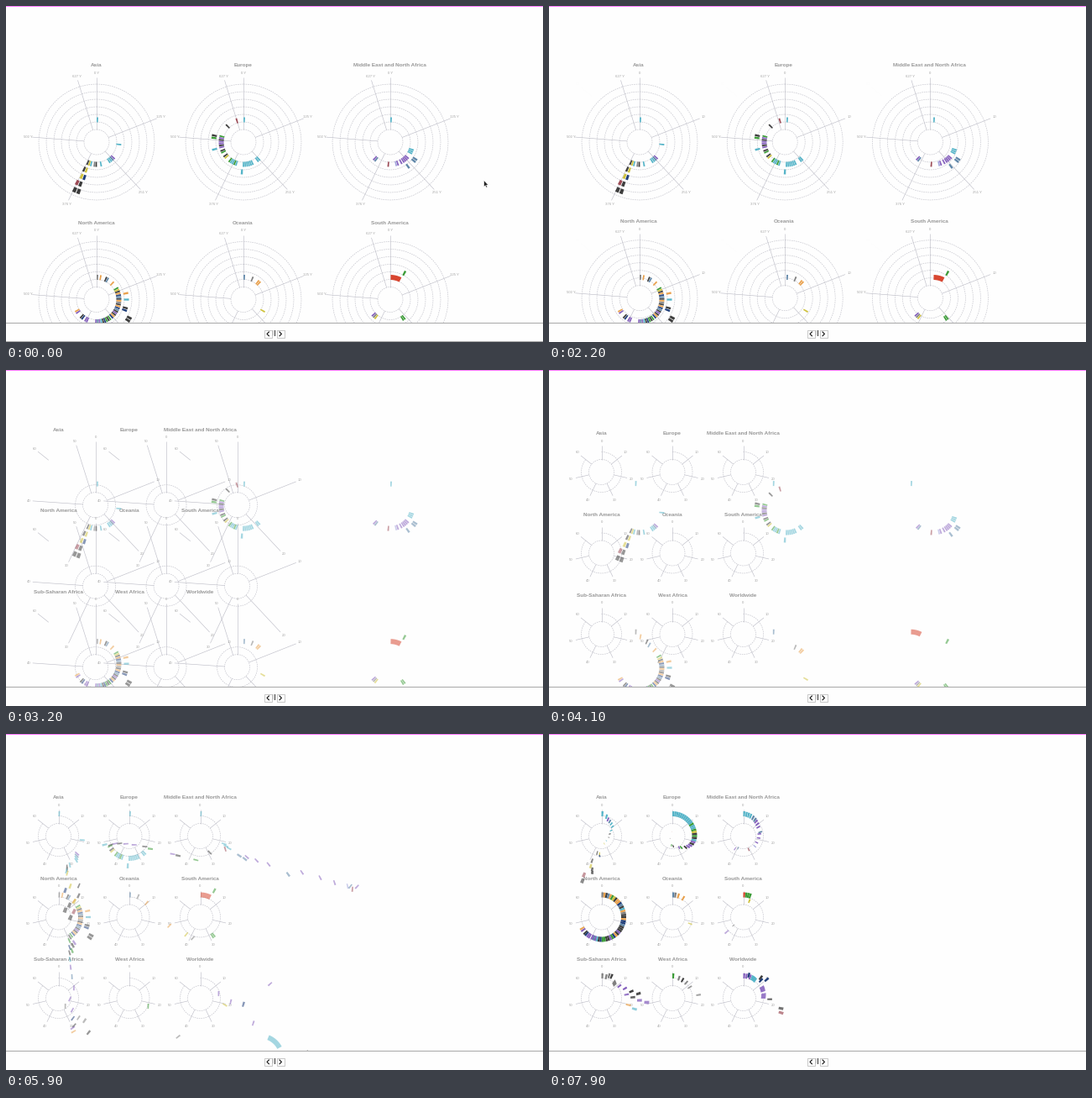
A matplotlib script for the animation above (8000 ms loop, 640 px wide and 400 px high).

```python
import numpy as np
import matplotlib.pyplot as plt
from matplotlib.animation import FuncAnimation
from matplotlib.collections import LineCollection, PolyCollection
from matplotlib.colors import to_rgb
from matplotlib.patches import Polygon, Rectangle

W, H, DPI = 640, 400, 100
FRAMES, STEP = 80, 100
PX = 72 / DPI
plt.rcParams["font.family"] = "Liberation Sans"

COLORS = {"c": "#55b4c8", "p": "#8560bd", "k": "#3c3c3c", "o": "#e9a04b",
          "y": "#cfc23c", "g": "#3a9b36", "b": "#1d3c78", "s": "#5f86a8",
          "r": "#d8452f", "e": "#808080", "n": "#9c4a55", "l": "#a3a6dc"}

# Title, stagger lag, sorting span in ms, runs of tiles.
# Each run: start angle, one colour letter per tile, ring level, tile width.
CHARTS = [
    ("Asia", 0.7, 1750,
     [(2, "c"), (96, "c"), (133, "psc"), (147, "c"), (169, "c"), (181, "ke"),
      (194, "cyk"), (200, "yk", 2), (199, "by", 3), (201, "kn", 4),
      (200, "kk", 5)]),
    ("Europe", 0.25, 1520,
     [(2, "c"), (138, "cc"), (157, "cccccc"), (183, "c", 2), (198, "cgccg"),
      (229, "yk"), (244, "gk"), (256, "c", 2), (257, "pkppkpg"),
      (278, "gk", 2), (315, "k"), (343, "n")]),
    ("Middle East and North Africa", 0.66, 1620,
     [(2, "c"), (109, "ccc"), (124, "ss", 2), (132, "pppp"), (144, "s", 2),
      (152, "p"), (161, "pl"), (185, "n"), (219, "sp")]),
    ("North America", 0, 1500,
     [(2, "e"), (10, "o"), (24, "ks"), (44, "o"), (61, "gy"),
      (70, "kobskoekobsk"), (78, "o", 2), (90, "c", 2), (106, "kb", 2),
      (119, "kk", 3), (125, "pkob"), (145, "gkgbk"), (148, "pkg", 2),
      (168, "cpsp"), (204, "pp"), (217, "bk"), (236, "po")]),
    ("Oceania", 0.5, 1800, [(2, "s"), (23, "e"), (39, "oo"), (120, "y")]),
    ("South America", 0, 2200,
     [(14, "r", 1, 26), (28, "g", 2), (143, "gg"), (219, "yep")]),
    ("Sub-Saharan Africa", 0.78, 1650,
     [(2, "e"), (34, "ek", 2), (34, "e"), (82, "e", 1, 28), (90, "pp", 2),
      (92, "pk", 3), (94, "kp", 4), (94, "kp", 5), (109, "o", 2),
      (111, "c", 3)]),
    ("West Africa", 0.78, 1650,
     [(2, "g"), (52, "eke"), (72, "e"), (91, "e", 2)]),
    ("Worldwide", 0.75, 1650,
     [(2, "p"), (14, "pp"), (17, "b", 2), (42, "c", 1, 40),
      (54, "kb", 3), (56, "b", 2), (78, "p", 1, 20), (99, "p", 1, 18),
      (101, "k", 2), (110, "kn", 4)]),
]

OLD_LABELS = ["0 Y", "125 Y", "251 Y", "376 Y", "502 Y", "627 Y", ""]
NEW_LABELS = [str(10 * i) for i in range(7)]
OLD_STEP, NEW_STEP = 68.6, 360 / 7
GRID_T, AXIS_T, MOVE_T, SORT_T = 2030, 3000, 3790, 5950


def lerp(a, b, t):
    return a + (b - a) * t


def ease(t, start, length=1000):
    x = min(max((t - start) / length, 0), 1)
    return 4 * x ** 3 if x < 0.5 else 1 - 4 * (1 - x) ** 3


def polar(r, deg):
    a = np.radians(deg)
    return np.stack([r * np.sin(a), -r * np.cos(a)], axis=-1)


def tile(mid, width, level=1):
    n = max(5, int(width // 3))
    a = np.linspace(mid - width / 2, mid + width / 2, n)
    inner = 15 + 9 * level - 0.5
    return np.concatenate([polar(inner + 6, a), polar(inner, a[::-1])])


def unroll(runs):
    items = []
    for angle, letters, *rest in runs:
        level = rest[0] if rest else 1
        width = rest[1] if len(rest) > 1 else 3.7
        for i, c in enumerate(letters):
            items.append((angle + 4.6 * i, level, width, c))
    return sorted(items)


class Tile:
    def __init__(self, k, i, n, lag, span, item):
        angle, level, width, c = item
        self.row, self.col = divmod(k, 3)
        self.old = tile(angle, width, level)
        m = len(self.old) // 2
        a = np.linspace(0, 4.9, m) + NEW_STEP / 10 * i
        self.new = np.concatenate([polar(29.5, a), polar(23.5, a[::-1])])
        self.rgb = to_rgb(COLORS[c])
        # In the upper rows the first tile leaves ahead of the rest.
        leads = i == 0 and self.row < 2
        turn = 0 if leads else lerp(lag, 1, i / n)
        self.move_t = MOVE_T + 1860 * turn
        self.sort_t = SORT_T + span * turn

    def at(self, t, drop, fade):
        p, q = ease(t, self.move_t), ease(t, self.sort_t)
        x = lerp(108 + 175 * self.col, 62.5 + 84.5 * self.col, p)
        y = lerp(162 + 187.5 * self.row + drop, 121.5 + 96.5 * self.row, p)
        alpha = lerp(1 - 0.47 * fade, 1, min(1, 2 * q))
        return lerp(self.old, self.new, q) + (x, y), (*self.rgb, alpha)


tiles = []
for k, (_, lag, span, runs) in enumerate(CHARTS):
    items = unroll(runs)
    tiles += [Tile(k, i, len(items), lag, span, it) for i, it in enumerate(items)]

fig = plt.figure(figsize=(W / DPI, H / DPI), dpi=DPI, facecolor="#fefefe")
ax = fig.add_axes([0, 0, 1, 1])
ax.set(xlim=(0, W), ylim=(H, 0))
ax.axis("off")

rings = ax.add_collection(LineCollection([], linewidths=0.65 * PX,
                                         linestyles=[(0, (2.5, 1.5))], zorder=1))
spokes = ax.add_collection(LineCollection([], linewidths=0.6 * PX, zorder=2))
arcs = ax.add_collection(PolyCollection([], linewidths=0, zorder=4))


def label(size, color, va="center", **kw):
    return ax.text(0, 0, "", fontsize=size * PX, color=color, ha="center",
                   va=va, zorder=3, **kw)


titles = [label(6.4, "#989898", "baseline", weight="bold") for _ in CHARTS]
ticks = [[label(4.2, "#a4a4a4") for _ in range(7)] for _ in CHARTS]
for text, chart in zip(titles, CHARTS):
    text.set_text(chart[0])


def box(x, y, w, h, face, edge="none", z=6):
    ax.add_patch(Rectangle((x, y), w, h, fc=face, ec=edge, lw=0.8 * PX, zorder=z))


def chevron(x, y, d):
    ax.plot([x - d, x + d, x - d], [y - 2.4, y, y + 2.4], color="#111",
            lw=1.1 * PX, zorder=7)


box(0, 0, W, 1.3, "#ff7cff")
box(0, 377, W, 23, "#fefefe", z=5)
box(0, 377, W, 1, "#a8a8a8")
for x, d in ((307.5, -1.2), (322.5, 1.2)):
    box(x, 385.5, 9.5, 9.5, "#fefefe", "#bcbcbc")
    chevron(x + 4.7, 390.4, d)
box(317.7, 386, 1.3, 6, "#c4c4c4")
box(319.8, 385.5, 1.6, 7, "#333333")

footer = ax.add_patch(Rectangle((0, 399), W, 1, fc="#a8a8a8", ec="none", zorder=6))
pointer = np.array([(0, 0), (0, 7.2), (1.6, 5.8), (2.8, 8.4), (3.9, 7.9),
                    (2.8, 5.4), (4.9, 5.2)]) + (569.7, 207.8)
cursor = ax.add_patch(Polygon(pointer, fc="#222", ec="white", lw=0.4 * PX, zorder=8))


def draw(frame):
    t = frame * STEP
    g, a = ease(t, GRID_T), ease(t, AXIS_T)
    drop = 5 * a
    dx, dy = lerp(175, 84.5, g), lerp(187.5, 96.5, g)
    old_mid, new_mid = np.array([108, 162]), np.array([62.5, 116.5])

    ring_lines, ring_cols, spoke_lines, spoke_cols = [], [], [], []
    for k in range(len(CHARTS)):
        row, col = divmod(k, 3)
        base = np.array([dx * col, dy * row + drop])
        titles[k].set_position((lerp(107.5, 62.5, g) + base[0], 72.4 + base[1]))

        mid = base + lerp(old_mid, new_mid, a)
        for j in range(7):
            show = 1 if j < 2 else 1 - g
            if show < 0.02:
                continue
            end = lerp(360, 6 * NEW_STEP, a) if j == 1 else 360
            ring_lines.append(mid + polar(15 + 9 * j, np.linspace(0, end, 61)))
            ring_cols.append((0.77, 0.77, 0.8, show))

        for j, text in enumerate(ticks[k]):
            old, new = j * OLD_STEP, j * NEW_STEP
            far = polar(np.array([15, 77, 82]), old) + old_mid
            near = polar(np.array([15, 31.3, 37]), new) + new_mid
            pts = base + (near if j == 6 else lerp(far, near, a))
            show = g if j == 6 else 1
            spoke_lines.append(pts[:2])
            spoke_cols.append((0.74, 0.74, 0.78, show))
            switch = GRID_T if j in (0, 1, 6) else AXIS_T
            text.set_text((NEW_LABELS if t >= switch else OLD_LABELS)[j])
            text.set_position(pts[2])
            text.set_alpha(show)

    rings.set_segments(ring_lines)
    rings.set_color(ring_cols)
    spokes.set_segments(spoke_lines)
    spokes.set_color(spoke_cols)

    verts, cols = zip(*(s.at(t, drop, g) for s in tiles))
    arcs.set_verts(verts)
    arcs.set_facecolor(cols)

    early = t < 2000
    cursor.set_visible(early)
    footer.set_visible(early)
    return [rings, spokes, arcs, cursor, footer]


anim = FuncAnimation(fig, draw, frames=FRAMES, interval=STEP,
                     init_func=lambda: draw(0), repeat=True, repeat_delay=0)
plt.show()
```
